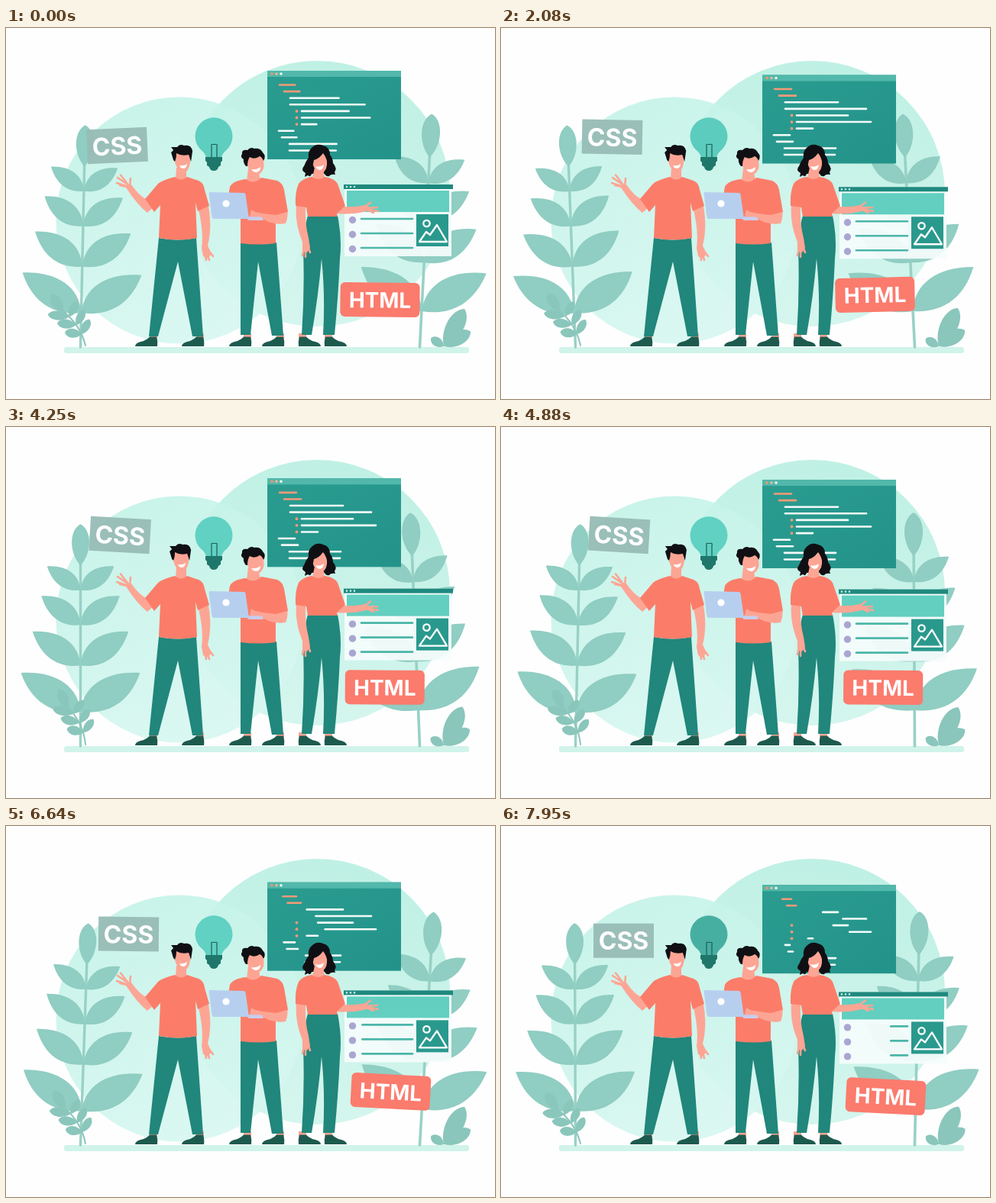
Recreate the animation shown at these times as an HTML page. Size 640 by 486 pixels, loop 8 s.

```html
<!DOCTYPE html>
<html lang="en">
<head>
<meta charset="utf-8">
<title>Web team</title>
<style>
  html, body { margin: 0; width: 100%; height: 100%; overflow: hidden; background: #fefefe; }
  svg { display: block; width: 100vw; height: 100vh; }
  text { font-family: Inter, "Open Sans", sans-serif; font-weight: 700; fill: #fff; text-anchor: middle; }
  .skin { fill: #fda594; }
  .shirt { fill: #fb7d69; }
  .pants { fill: #21867b; }
  .hair { fill: #101014; }
  .leaf { fill: #90cdc2; }
  .sprig { fill: #8ac6bb; }
  .stem { fill: none; stroke: #98d1c6; stroke-width: 3.6; stroke-linecap: round; }
  .thin { stroke: #8ac6bb; stroke-width: 2; }
  .finger { fill: none; stroke: #fda594; stroke-width: 2.6; stroke-linecap: round; stroke-linejoin: round; }
  .smile { fill: #fff; }
  .icon { fill: none; stroke: #fff; stroke-width: 2.3; stroke-linejoin: round; }
  .row { stroke-width: 2.6; stroke-linecap: round; }
</style>
</head>
<body>
<svg viewBox="0 0 640 486">
  <defs>
    <linearGradient id="mintA" x1="0" y1="0" x2=".5" y2="1">
      <stop offset="0" stop-color="#c0f2e6"/><stop offset="1" stop-color="#d6f7f0"/>
    </linearGradient>
    <linearGradient id="mintB" x1=".6" y1="0" x2=".4" y2="1">
      <stop offset="0" stop-color="#bff0e4"/><stop offset="1" stop-color="#d5f6ee"/>
    </linearGradient>
    <linearGradient id="panel" x1="0" y1="0" x2="1" y2="1">
      <stop offset="0" stop-color="#2b9c90"/><stop offset="1" stop-color="#23938a"/>
    </linearGradient>
    <g id="plant"/>
    <g id="shoe">
      <path class="skin" d="M19 400H29V408H19Z"/>
      <path fill="#1d5a4e" d="M0 417Q0 412 11 410Q17 407 19 404.500L28 404.500Q30 411 29 417Z"/>
    </g>
  </defs>

  <circle cx="407" cy="217" r="174" fill="url(#mintB)"/>
  <circle cx="227" cy="252" r="161.500" fill="url(#mintA)" opacity=".9"/>
  <rect x="76" y="418" width="530" height="8" rx="3" fill="#d0f3ea"/>

  <use href="#plant" id="plantL"/>
  <use href="#plant" id="plantR"/>
  <g id="sprigL"/>
  <g id="sprigR"/>

  <g id="editor">
    <rect x="342" y="56" width="175" height="116" fill="url(#panel)"/>
    <rect x="342" y="56" width="175" height="8" fill="#52b8ab"/>
    <circle cx="348" cy="60" r="1.800" fill="#f5946f"/>
    <circle cx="354" cy="60" r="1.800" fill="#f5b48c"/>
    <circle cx="360" cy="60" r="1.800" fill="#e6f6f3"/>
  </g>

  <g id="page">
    <rect x="443" y="205" width="140" height="94" fill="#f6fdfc" opacity=".93"/>
    <rect x="442" y="205" width="143" height="6" fill="#1f897e"/>
    <g fill="#bfe9e2"><circle cx="446" cy="208" r="1.300"/><circle cx="451" cy="208" r="1.300"/><circle cx="456" cy="208" r="1.300"/></g>
    <rect x="446" y="213" width="134" height="28" fill="#62cfc0"/>
    <rect x="537" y="244" width="42" height="42" fill="#2a998d"/>
    <circle class="icon" cx="550.500" cy="256" r="4.200"/>
    <path class="icon" d="M541 280L550 267L555 271L564 258L577 280Z"/>
  </g>

  <g id="bulb">
    <path id="glass" d="M262 170Q261 164 255 159.500A24.500 24.500 0 1 1 289 159.500Q283 164 282 170Z"/>
    <path d="M269 169V155Q268 151.500 271 152.500H274Q277 151.500 276 155V169" fill="none" stroke="#1b5d54" stroke-width="1.200"/>
    <path d="M261 169H283V174L281 176V180L278 182Q277 187 272 187Q267 187 266 182L263 180V176L261 174Z" fill="#1f776b"/>
  </g>

  <g id="css">
    <rect x="-39.500" y="-22.500" width="79" height="45" fill="#98bdb7" opacity=".96"/>
    <text y="12" font-size="32">CSS</text>
  </g>

  <g id="shoes"/>

  <g id="guide">
    <path class="pants" d="M200 275Q225 280 249 275L258 404H244L225 306L199 404H187Z"/>
    <path class="skin" d="M252 238L265 233Q270 262 264 285L269 296L264 302L258 299L256 288Q259 268 252 238Z"/>
    <path class="finger" d="M264 290L271 299M263 293L266 304M260 294L262 304"/>
    <path class="skin" d="M194 234L185 242Q172 232 157 209L164 205Q174 220 185 225Z"/>
    <path class="finger" d="M162 207L146 196M161 207L150 192.500M160 208L145 203M162 208L163 197M158 208L149 206"/>
    <path class="skin" d="M223 183H236V197Q229 203 222 197Z"/>
    <path class="shirt" d="M221 195Q229 202 237 195L252 200Q259 203 260 212L266 233L251 240L248 229L250 275Q226 280 200 275L202 232L194 241L182 224L199 204Q205 199 221 195Z"/>
    <g id="guideHead">
      <path class="skin" d="M219 162H239V176Q237 189 230 189Q222 187 219 176Z"/>
      <path class="smile" d="M225 180Q231 181 235 178Q234 184 230 184Q226 184 225 180Z"/>
      <path class="hair" d="M217 173L214 163L217 160L214 156L222 156Q225 151 231 154Q240 152 242 161L240 175L237 166Q227 168 221 164Q221 170 219 175Z"/>
    </g>
  </g>

  <g id="coder">
    <path class="pants" d="M307 281H354L363 403H348L330 306L320 402H307Z"/>
    <path class="skin" d="M268 241L290 239L300 250H272Z"/>
    <path class="skin" d="M317 184H330L333 200Q324 206 315 200Z"/>
    <path class="shirt" d="M314 198Q324 206 334 196L355 200Q362 203 364 212L369 241L353 246L353 282Q330 285 307 282V222L290 226L293 208Q297 200 314 198Z"/>
    <path class="skin" d="M353 245L368.500 241Q369 250 366 256Q350 259 334 249L319 247L321 238L326 241L336 243Z"/>
    <path d="M312 247L335 247.500L337 252L318 252Z" fill="#c9cdec"/>
    <path d="M267 215L311 216Q313 216 313.500 218L318 250H272Q270 250 269.500 247L265.500 217Q265.500 215 267 215Z" fill="#b7cfef"/>
    <circle cx="288" cy="230" r="4.600" fill="#fff"/>
    <path class="skin" d="M314 168L334 165Q339 176 337 184Q333 193 327 192Q317 187 314 176Z"/>
    <path class="smile" d="M321 185Q328 186 333 182Q333 188 328 189Q323 189 321 185Z"/>
    <path class="hair" d="M314 181Q310 176 311 172Q306 169 309 165Q308 159 316 160Q320 155 325 158Q333 157 336 163Q341 168 337 174Q335 169 332 168Q325 173 319 169Q316 173 316 181Z"/>
  </g>

  <g id="host">
    <path class="hair" d="M399 158Q406 150 415 154Q424 156 424 166Q428 171 428 177Q434 184 430 189L431 192Q425 191 423 194Q419 195 417 191L400 191Q399 196 395 193L391 195L392 190Q385 186 390 181Q392 175 396 170Q395 162 399 158Z"/>
    <path class="pants" d="M395 246H434Q440 275 437 302Q435 350 430 402H415Q418 350 413 302Q409 350 400 402H387Q391 345 389 290Q390 262 395 246Z"/>
    <path class="skin" d="M380 232L392 235Q391 256 396 275L398 288L394 294L388 292L388 280Q378 257 380 232Z"/>
    <path class="finger" d="M390 288L388 298M392 288L392 300M395 286L398 294"/>
    <path class="skin" d="M432 243L443 234Q456 235 470 232L477 236L472 240Q453 245 432 243Z"/>
    <path class="finger" d="M471 236L486 235M471 237L487 240M471 237L481 242M470 234L477 228.500"/>
    <path class="skin" d="M404 183H415L417 196Q409 202 401 196Z"/>
    <path class="shirt" d="M400 195Q409 201 417 195Q430 197 434 204L444 233L433 243L434 247H395L393 235L379 233Q378 215 383 204Q388 197 400 195Z"/>
    <path class="skin" d="M402 165L418 163Q422 175 419 184Q415 192 410 190Q403 186 401 176Z"/>
    <path class="smile" d="M405 181Q411 183 416 179Q415 186 411 186Q407 186 405 181Z"/>
    <path class="hair" d="M397 185Q395 166 402 160Q410 154 418 160Q423 166 421 180Q420 170 415 164Q409 172 403 173Q402 181 397 185Z"/>
  </g>

  <g id="html">
    <rect x="-52" y="-22.500" width="104" height="45" rx="6" fill="#fb7b6d"/>
    <text y="10.500" font-size="28">HTML</text>
  </g>
</svg>
<script>
const $ = id => document.getElementById(id);
const LOOP = 8000;

function add(parent, tag, attrs) {
  const el = document.createElementNS("http://www.w3.org/2000/svg", tag);
  for (const k in attrs) el.setAttribute(k, attrs[k]);
  return parent.appendChild(el);
}

function petal(parent, kind, x, y, angle, len, w) {
  add(parent, "path", { class: kind, transform: `translate(${x} ${y}) rotate(${angle})`,
    d: `M0 0C${len * 0.3} ${w} ${len * 0.85} ${w} ${len} 0C${len * 0.85} ${-w} ${len * 0.3} ${-w} 0 0Z` });
}

// Leaf pairs shrink and close up towards the top.
function buildPlant() {
  const g = $("plant");
  add(g, "path", { class: "stem", d: "M0 0V-258" });
  petal(g, "leaf", 0, -249, -90, 57, 16);
  for (let i = 0; i < 4; i++) {
    const base = -47 - 68 * i + 4 * i * i;
    const tip = -101 - 61 * i + 4 * i * i;
    const reach = 82 - 18 * i + 2 * i * i;
    for (const side of [-1, 1]) {
      const p = (fx, fy) => `${side * reach * fx} ${base + (tip - base) * fy}`;
      add(g, "path", { class: "leaf",
        d: `M${p(0, 0)}C${p(0.04, 0.7)} ${p(0.45, 1.05)} ${p(1, 1)}C${p(0.84, 0.3)} ${p(0.5, -0.08)} ${p(0, 0)}Z` });
    }
  }
}

function buildSprigs() {
  const l = $("sprigL"), r = $("sprigR");
  add(l, "path", { class: "stem thin", d: "M104 416Q97 388 72 370" });
  petal(l, "sprig", 74, 372, -125, 27, 9);
  for (let i = 0; i < 3; i++) {
    const u = 0.28 + 0.25 * i, v = 1 - u;
    const x = 104 * v * v + 194 * u * v + 72 * u * u;
    const y = 416 * v * v + 776 * u * v + 370 * u * u;
    petal(l, "sprig", x, y, 185, 22 + 3 * i, 8);
    petal(l, "sprig", x, y, -62, 22, 7);
  }
  for (const [angle, len] of [[-61, 56], [-29, 40], [-147, 20]]) petal(r, "sprig", 573, 417, angle, len, 4 + len / 5);
}

function buildShoes() {
  for (const x of [169, 230, 292, 335]) add($("shoes"), "use", { href: "#shoe", x });
  for (const x of [412, 446]) add($("shoes"), "use", { href: "#shoe", transform: `translate(${x} 0) scale(-1 1)` });
}

const makeRow = (parent, y, x, width, stroke) =>
  ({ x, width, el: add($(parent), "line", { class: "row", y1: y, y2: y, stroke }) });

const codeRows = [[358, 22], [364, 22], [372, 69], [372, 106], [387, 67], [387, 97], [387, 21],
                  [357, 21], [361, 21], [371, 67], [371, 66]].map(([x, width], i) => {
  const y = 74.5 + 8.6 * i;
  if (i > 3 && i < 7) add($("editor"), "circle", { cx: 380.5, cy: y, r: 1.9, fill: "#f59a78" });
  return makeRow("editor", y, x, width, i < 2 ? "#f59a78" : "#f4fbfa");
});

const copyRows = [250, 269, 288].map(y => {
  add($("page"), "circle", { cx: 453.5, cy: y + 1.5, r: 4.7, fill: "#aaa6d2" });
  return makeRow("page", y, 465, 67, "#4bb6a9");
});

buildPlant();
buildSprigs();
buildShoes();

const clamp = u => Math.min(1, Math.max(0, u));
const ramp = (t, from, to) => clamp((t - from) / (to - from));
const ease = (t, from, to) => { const u = ramp(t, from, to); return u * u * (3 - 2 * u); };
const wave = (t, peak, period) => Math.cos(2 * Math.PI * (t - peak) / period);

const place = (id, x, y, turn = 0) => $(id).setAttribute("transform", `translate(${x} ${y}) rotate(${turn})`);
const pivot = (id, turn, x, y) => $(id).setAttribute("transform", `rotate(${turn} ${x} ${y})`);

// Show the part of a row between two fractions of its width.
function span(row, from, to) {
  row.el.setAttribute("x1", row.x + row.width * from);
  row.el.setAttribute("x2", row.x + row.width * to);
}

function draw(t) {
  $("plantL").setAttribute("transform", `translate(97.5 418) rotate(${-2.3 * wave(t, 2450, 7200)}) scale(.95)`);
  place("plantR", 541.5, 418, -0.4 - 3.8 * wave(t, 3050, 7200));
  pivot("sprigL", 4.5 - 4.5 * wave(t, 700, 7600), 104, 416);
  pivot("sprigR", -2 + 2 * wave(t, 0, 6600), 574, 417);

  place("editor", 0, t / 375);
  place("page", 0, t / 640);
  place("css", 145.5 + 15 * ease(t, 3400, 6000),
    154 - 12.5 * (ease(t, 0, 2600) - ease(t, 6640, 8700)),
    -2.5 + 3.5 * ease(t, 0, 2000) + 2.5 * ease(t, 2800, 4700) - 3.5 * ease(t, 5000, 7200));
  place("html", 489.5 + 14 * ease(t, 2900, 5800), 348.5 + 7.5 * wave(t, 0, 9000),
    0.5 - 3.3 * ease(t, 0, 1200) + 3.1 * ease(t, 1300, 2900) + 2.7 * ease(t, 4600, 6600));
  place("guideHead", 0.8 + 1.3 * wave(t, 6400, 6400), 0);

  const dim = Math.max(0, wave(t, 1100, 6900)) ** 4;
  $("glass").setAttribute("fill", `rgb(${[96 - 25 * dim, 209 - 34 * dim, 195 - 33 * dim].map(Math.round)})`);

  const typed = 0.92 + 0.08 * ramp(t, 0, 1000);
  const erased = ramp(t, 5600, 8900);
  codeRows.forEach((row, i) => span(row, erased * (i < 2 ? 0.65 : 1), typed));
  for (const row of copyRows) span(row, ramp(t, 6600, 8600), 1);
}

function tick(now) {
  draw(now % LOOP);
  requestAnimationFrame(tick);
}
draw(0);
requestAnimationFrame(tick);
</script>
</body>
</html>
```
